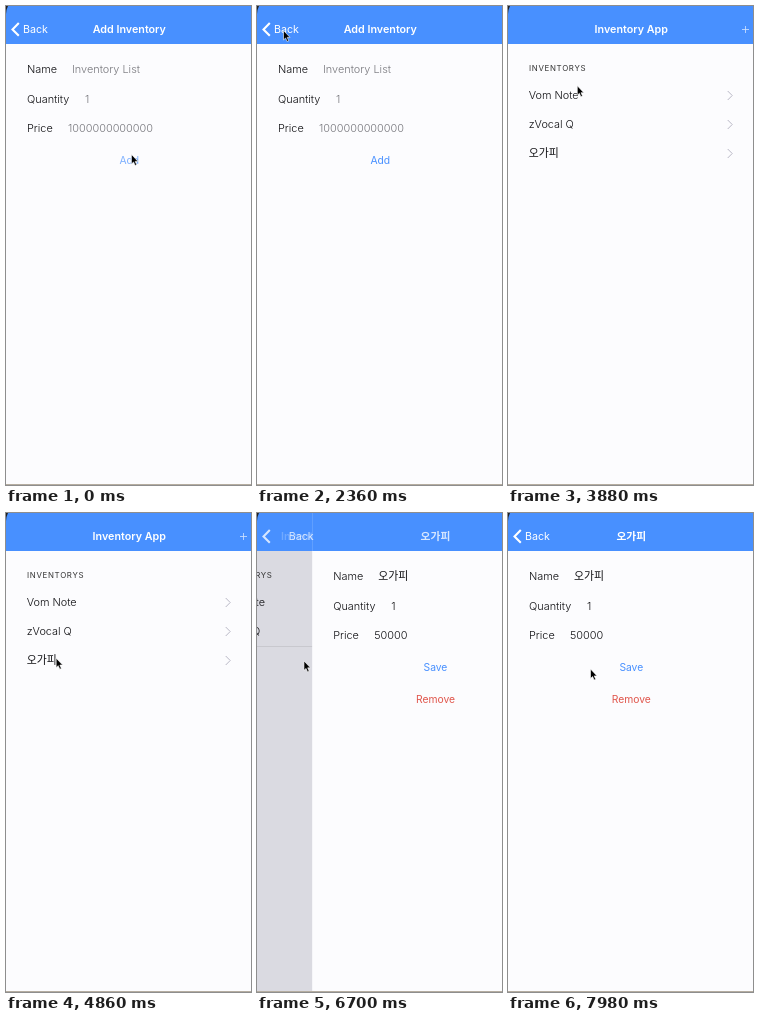
An HTML page for the animation above (8000 ms loop, 245x479 px).

```html
<!DOCTYPE html>
<html lang="ko">
<head>
<meta charset="utf-8">
<title>Inventory App</title>
<style>
  html, body { margin: 0; width: 100%; height: 100%; overflow: hidden; background: #fcfcfe; }
  svg { display: block; width: 245px; height: 479px; }
  text { font: 300 10.9px Inter, "Noto Sans CJK KR", "Noto Sans CJK", sans-serif; fill: #111114; }
  .title { font-size: 10.75px; font-weight: 600; text-anchor: middle; fill: #fff; }
  .light { font-size: 10.7px; font-weight: 400; fill: #fff; }
  .head { font-size: 7.9px; font-weight: 400; letter-spacing: .68px; fill: #333; }
  .hint .value { fill: #77777c; }
  .button { font-size: 10.3px; font-weight: 400; text-anchor: middle; fill: #4890ff; }
  .danger { fill: #e0564c; }
  .line { fill: none; stroke: #b9b8c6; }
  .bar { fill: #4890ff; }
</style>
</head>
<body>
<svg viewBox="0 0 245 479">
  <g id="list">
    <rect id="listBack" width="326" height="479"/>
    <path id="rule" d="M0 133.5H326" stroke="#777"/>
    <text class="head" x="21" y="64.8">INVENTORYS</text>
    <text x="20.7" y="93">Vom Note</text>
    <text x="20.7" y="122">zVocal Q</text>
    <text x="20.7" y="151">오가피</text>
    <path class="line" d="M219.7 85l4.5 4.5l-4.5 4.5m0 20l4.5 4.5l-4.5 4.5m0 20l4.5 4.5l-4.5 4.5"/>
    <rect class="bar" width="326" height="38"/>
  </g>
  <text id="listTitle" class="title" x="123.3" y="27.4">Inventory App</text>
  <path id="plus" d="M234 23.5h7m-3.5-3.5v7" stroke="#fff" stroke-width=".8"/>

  <g id="form">
    <rect width="245" height="479" fill="#fcfcfe"/>
    <rect class="bar" width="245" height="38"/>
    <text x="21" y="67">Name</text>
    <text x="21" y="96.5">Quantity</text>
    <text x="21" y="125.8">Price</text>
    <g id="addFields" class="hint">
      <text class="value" x="66" y="67">Inventory List</text>
      <text class="value" x="79" y="96.5">1</text>
      <text class="value" x="62" y="125.8">1000000000000</text>
      <text id="addButton" class="button" x="123.3" y="158">Add</text>
    </g>
    <g id="editFields">
      <text x="66" y="67">오가피</text>
      <text x="79" y="96.5">1</text>
      <text x="62" y="125.8">50000</text>
      <text class="button" x="123.3" y="158">Save</text>
      <text class="button danger" x="123.3" y="190.2">Remove</text>
    </g>
  </g>
  <text id="formTitle" class="title" x="123.3" y="27.4"></text>
  <path id="arrow" d="M12.8 17L6.5 23.4L12.8 29.8" fill="none" stroke="#fff" stroke-width="2.1"/>
  <text id="backLabel" class="light" x="17" y="27.4">Back</text>

  <path d="M0 0H2Q.4 3 0 8Z" fill="#222"/>
  <path d="M0 478.5H245" stroke="#b5ada0"/>
  <path id="cursor" d="M0 0V9.4L2.1 7.5L3.6 11L5.2 10.3L3.7 6.9H6.5Z" fill="#000" stroke="#fff" stroke-width=".6"/>
</svg>
<script>
const LOOP = 8000, WIDTH = 245, SLIDE = 500, POP = 2963, PUSH = 6556;
const $ = id => document.getElementById(id);
const clamp = v => Math.min(1, Math.max(0, v));
const smooth = v => v * v * (3 - 2 * v);

// Pointer path: time, x, y
const path = [
  [0, 125.5, 148.5], [500, 125.5, 148.5], [1120, 44, 50], [1260, 41, 47],
  [1800, 26.5, 24.5], [3540, 26.5, 24.5], [3880, 69.3, 79.8], [4320, 68, 138],
  [5000, 48, 146], [5420, 46.7, 147.5], [7100, 47, 148], [7960, 82.5, 156]
];

// cubic-bezier(.36, .66, .04, 1), solved by bisection
function pageEase(x) {
  x = clamp(x);
  const curve = (s, a, b) => 3 * (1 - s) ** 2 * s * a + 3 * (1 - s) * s * s * b + s ** 3;
  let low = 0, high = 1;
  for (let i = 0; i < 24; i++) {
    const mid = (low + high) / 2;
    if (curve(mid, .36, .04) < x) low = mid; else high = mid;
  }
  return curve((low + high) / 2, .66, 1);
}

function place(id, x, opacity = 1, y = 0) {
  $(id).setAttribute("transform", `translate(${x} ${y})`);
  $(id).style.opacity = opacity;
}

function pointerAt(t) {
  const next = path.findIndex(key => key[0] > t);
  if (next < 0) return path[path.length - 1].slice(1);
  const [t0, x0, y0] = path[next - 1], [t1, x1, y1] = path[next];
  const k = smooth((t - t0) / (t1 - t0));
  return [x0 + (x1 - x0) * k, y0 + (y1 - y0) * k];
}

function draw(now) {
  const t = now % LOOP;
  const adding = t < POP + SLIDE;
  const shown = adding ? 1 - pageEase((t - POP) / SLIDE) : pageEase((t - PUSH) / SLIDE);
  const hidden = 1 - shown;
  const formX = WIDTH * hidden, listX = -WIDTH * .33 * shown;

  place("list", listX);
  place("form", formX);
  place("listTitle", listX, hidden);
  place("formTitle", formX, shown);
  place("plus", 0, hidden * .75);
  place("arrow", 0, shown);
  place("backLabel", (adding ? 196 : 65) * hidden, shown);

  // The covered list darkens
  const shade = 252 - 34 * clamp(2 * shown);
  $("listBack").setAttribute("fill", `rgb(${shade},${shade},${254 - 80 * shown ** 4})`);
  $("rule").style.opacity = shown * hidden;
  $("formTitle").textContent = adding ? "Add Inventory" : "오가피";
  $("addFields").style.display = adding ? "" : "none";
  $("editFields").style.display = adding ? "none" : "";
  $("addButton").style.opacity = t < 100 ? .7 : t < 140 ? .85 : 1;

  const [x, y] = pointerAt(t);
  place("cursor", x, 1, y);
}

const start = performance.now();
function tick() {
  draw(performance.now() - start);
  requestAnimationFrame(tick);
}
tick();
</script>
</body>
</html>
```
